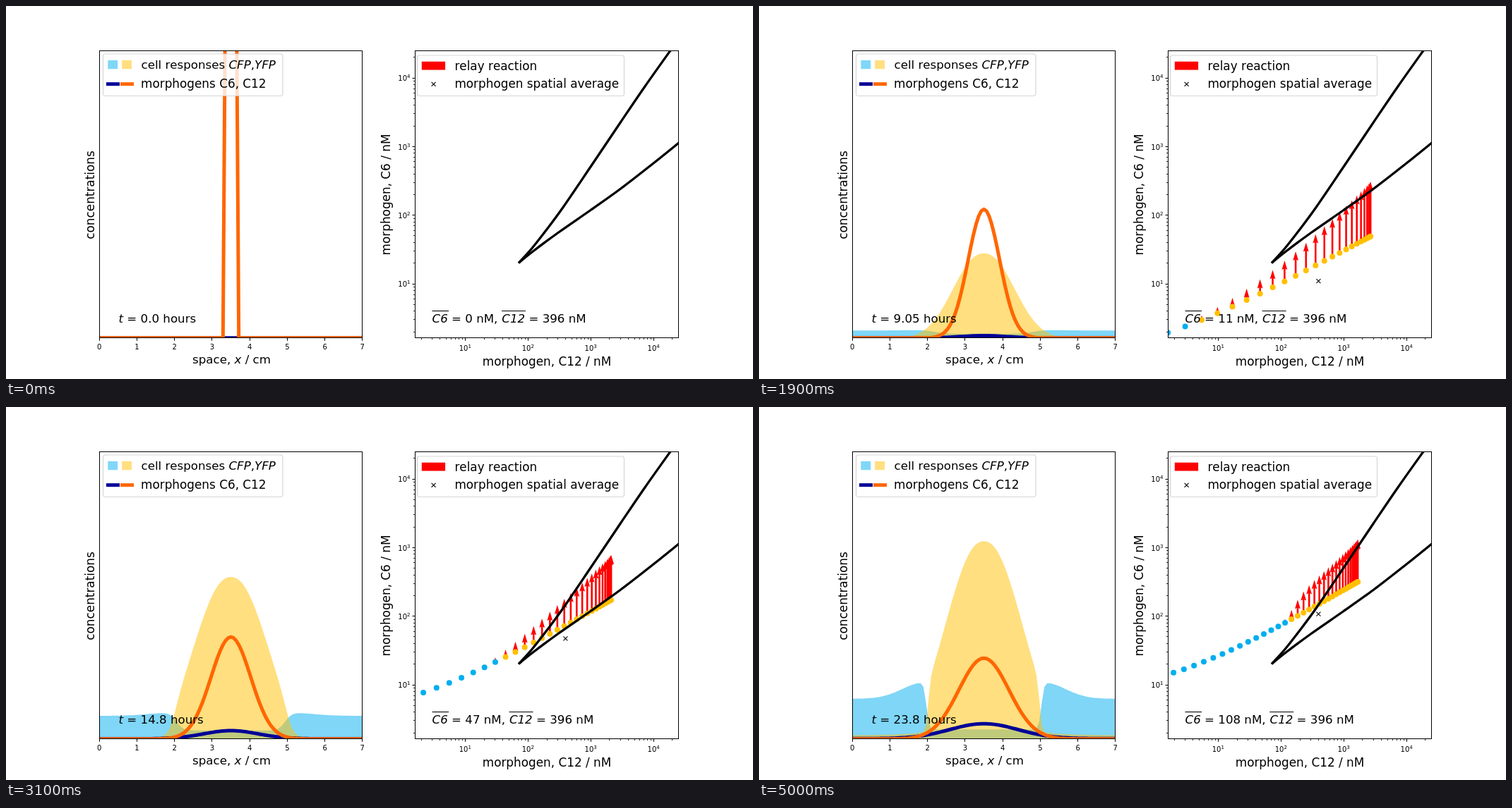
Recreate the animation shown at these times as an HTML page. Size 1058x529 px, loop 5.1 s.

```html
<!DOCTYPE html>
<html lang="en">
<head>
<meta charset="utf-8">
<title>Morphogen relay</title>
<style>
  html, body { margin: 0; width: 100%; height: 100%; overflow: hidden; background: #fff; }
  svg { display: block; width: 1058px; height: 529px; }
  text { font: 16.67px "DejaVu Sans", sans-serif; font-kerning: none; white-space: pre; }
  .plain { font-size: 16.85px; }
  .mid { text-anchor: middle; }
  .tick text { font-size: 10px; text-anchor: middle; }
  .tick .end { text-anchor: end; }
  .tick .exp { font-size: 7px; }
  .i { font-style: italic; }
  .line { fill: none; stroke-width: 5; stroke-linejoin: round; }
  .edge { fill: none; stroke-width: 3.3; stroke: #000; stroke-linejoin: round; }
  .axis { fill: none; stroke: #000; stroke-width: 1; }
  .minor { fill: none; stroke: #000; stroke-width: .8; }
  .box { fill: #fff; fill-opacity: .8; stroke: #ccc; stroke-opacity: .8; stroke-width: 1.2; }
  .thin { fill: none; stroke: #000; stroke-width: 1.1; }
</style>
</head>
<body>
<svg viewBox="0 0 1058 529">
  <clipPath id="clipL"><rect x="132.25" y="63.5" width="372.5" height="407.3"/></clipPath>
  <clipPath id="clipR"><rect x="579.6" y="63.5" width="372.6" height="407.3"/></clipPath>

  <g clip-path="url(#clipL)">
    <path id="cfp" fill="#00aeef" fill-opacity=".5"/>
    <path id="yfp" fill="#ffc000" fill-opacity=".5"/>
    <path id="c6" class="line" stroke="#000096"/>
    <path id="c12" class="line" stroke="#ff6600"/>
  </g>
  <rect class="axis" x="132.5" y="63.5" width="372" height="407"/>
  <g>
    <rect class="box" x="137.5" y="68" width="254.5" height="59.5" rx="3.5"/>
    <rect x="144.3" y="77" width="13.8" height="12.3" fill="#7fd7f7"/>
    <rect x="164.2" y="77" width="13.8" height="12.3" fill="#ffdf80"/>
    <path d="M142 110.7h19" stroke="#000096" stroke-width="5"/>
    <path d="M162 110.7h19" stroke="#ff6600" stroke-width="5"/>
    <text x="191.5" y="89">cell responses <tspan class="i">CFP</tspan>,<tspan class="i">YFP</tspan></text>
    <text class="plain" x="191" y="116.3">morphogens C6, C12</text>
  </g>
  <text x="159.5" y="449"><tspan class="i">t</tspan> = <tspan id="hours">0.0</tspan> hours</text>
  <text class="mid" x="319.5" y="506.5">space, <tspan class="i">x</tspan> / cm</text>
  <text class="plain mid" transform="translate(125.3 268) rotate(-90)">concentrations</text>

  <g clip-path="url(#clipR)">
    <path id="arrows" fill="#f00"/>
    <path id="blue" fill="#00aeef"/>
    <path id="gold" fill="#ffc000"/>
    <path id="upper" class="edge"/>
    <path id="lower" class="edge"/>
    <path id="mean" class="thin" d="M-3-3l6 6m0-6l-6 6"/>
  </g>
  <rect class="axis" x="579.5" y="63.5" width="373" height="407"/>
  <g>
    <rect class="box" x="582.5" y="70" width="293" height="57.5" rx="3.5"/>
    <rect x="588.8" y="78.8" width="33.3" height="11.8" fill="#f00"/>
    <path class="thin" d="M602.6 107.8l6 6m0-6l-6 6"/>
    <text class="plain" x="635.4" y="91">relay reaction</text>
    <text class="plain" x="635.4" y="116.3">morphogen spatial average</text>
  </g>
  <text x="603.5" y="449"><tspan class="i">C6</tspan> = <tspan id="avg">0</tspan> nM, </text>
  <path class="thin" d="M603.5 432.5h23.5"/>
  <g id="second">
    <text x=".3" y="449"><tspan class="i">C12</tspan> = 396 nM</text>
    <path class="thin" d="M0 432.5h34"/>
  </g>
  <text class="plain mid" x="766" y="510">morphogen, C12 / nM</text>
  <text class="plain mid" transform="translate(544 267.5) rotate(-90)">morphogen, C6 / nM</text>
  <g class="tick" id="ticks"></g>
  <path class="axis" id="major"/>
  <path class="minor" id="minor"/>
</svg>
<script>
const $ = id => document.getElementById(id);
const BASE = 470.8, NM_PER_PX = 14.62, STEP = 0.07, N = 101;
const cmX = x => 132.25 + 53.22 * x;
const logX = c => 561.35 + 88.95 * Math.log10(c);
const logY = c => 491.3 - 97.3 * Math.log10(c);
const sigmoid = u => 1 / (1 + Math.exp(-u));
const softplus = (u, s) => s * Math.log1p(Math.exp(u / s));
const gauss = (d, v) => Math.exp(-d * d / (2 * v)) / Math.sqrt(2 * Math.PI * v);
const px = n => n.toFixed(2);
const snap = n => Math.floor(n) + 0.5;

// Cell response shape over time:
// step, yellow [height, width, cutoff, softness, tail], blue [outer, bump, cutoff, softness, inner]
const KEYS = [
  [0,  0,     .35,  2.6,  .2,  0,   0,    0,   1.3,  .15,  0],
  [7,  72.5,  .6,   2.6,  .2,  0,   .6,   0,   1.3,  .15,  .3],
  [19, 120,   1.08, 2.3,  .2,  .2,  10.5, .8,  1.3,  .15,  6],
  [27, 202.5, 1.25, 1.65, .13, 1,   26.5, 1.5, 1.38, .11,  10.5],
  [35, 249.5, 1.3,  1.53, .07, 2.5, 38.5, 8,   1.5,  .07,  13],
  [43, 272,   1.33, 1.5,  .04, 4,   49,   15,  1.53, .05,  13.5],
  [50, 280.5, 1.345, 1.49, .03, 5,  57,   23,  1.53, .035, 13.5]
];

function slope(i, j) {
  const a = KEYS[Math.max(i - 1, 0)], b = KEYS[Math.min(i + 1, KEYS.length - 1)];
  return (b[j] - a[j]) / (b[0] - a[0]);
}

function shapeAt(k) {
  let i = 0;
  while (i < KEYS.length - 2 && k >= KEYS[i + 1][0]) i++;
  const a = KEYS[i], b = KEYS[i + 1], w = b[0] - a[0], u = (k - a[0]) / w;
  return a.slice(1).map((p, n) => {
    const j = n + 1, q = b[j], m = slope(i, j) * w, e = slope(i + 1, j) * w;
    const v = p + u * (m + u * (3 * (q - p) - 2 * m - e + u * (2 * (p - q) + m + e)));
    return Math.max(0, v);
  });
}

// Five loaded grid points spreading by diffusion.
function c12At(d, t) {
  if (t === 0) return Math.abs(d) < 2.5 * STEP ? 8000 : 0;
  let sum = 0;
  for (let j = -2; j <= 2; j++) sum += gauss(d - j * STEP, 0.01825 * t);
  return 8000 * STEP * sum;
}

const meanC6 = t => 6.67 * softplus(t - 7.68, 1.1);
const c6At = (d, t) => meanC6(t) * (0.065 + 0.935 * 7 * gauss(d, 0.065 + 0.0318 * t));
const relayRate = t => 0.0338 * softplus(t - 6.2, 0.8);

function curve(height) {
  const pts = [];
  for (let i = 0; i < N; i++) {
    pts.push(px(cmX(i * STEP)) + ' ' + px(BASE - height((i - 50) * STEP)));
  }
  return 'M' + pts.join('L');
}
const area = height => curve(height) + `L${cmX(7)} ${BASE}L${cmX(0)} ${BASE}Z`;

function arrow(x, y, tip) {
  const len = y - tip;
  if (len < 0.5) return '';
  const s = Math.min(1, len / 13), w = 1.3 * s, h = 3.9 * s;
  const neck = tip + 11.7 * s, wing = tip + 13 * s;
  return `M${px(x - w)} ${px(y)}L${px(x - w)} ${px(neck)}L${px(x - h)} ${px(wing)}L${px(x)} ${px(tip)}` +
    `L${px(x + h)} ${px(wing)}L${px(x + w)} ${px(neck)}L${px(x + w)} ${px(y)}Z`;
}
const dot = (x, y) => `M${px(x - 4)} ${px(y)}a4 4 0 1 0 8 0a4 4 0 1 0-8 0Z`;

function hoursText(t) {
  const v = +t.toPrecision(3);
  return Number.isInteger(v) ? v.toFixed(1) : String(v);
}

function draw(k) {
  const t = k * 10 / 21;
  const [peak, wide, yCut, ySoft, tail, outer, bump, bCut, bSoft, inner] = shapeAt(k);

  $('yfp').setAttribute('d', area(x => {
    const d = Math.abs(x), on = sigmoid((yCut - d) / ySoft);
    const low = tail * (1 + Math.exp(-(d - 1.5) / 0.7));
    return on * peak * Math.exp(-Math.pow(d / wide, 2.22)) + (1 - on) * low;
  }));
  $('cfp').setAttribute('d', area(x => {
    const d = Math.abs(x), hill = bump * Math.exp(-Math.pow((d - 1.6) / 0.8, 2));
    return inner + sigmoid((d - bCut) / bSoft) * (outer - inner + hill);
  }));
  $('c6').setAttribute('d', curve(d => c6At(d, t) / NM_PER_PX));
  $('c12').setAttribute('d', curve(d => c12At(d, t) / NM_PER_PX));

  let arrows = '', blue = '', gold = '';
  for (let i = 50; i >= 0; i--) {
    const d = i * STEP, a = c12At(d, t), b = c6At(d, t);
    if (a < 1) continue;
    const x = logX(a), y = logY(b);
    const rate = relayRate(t) * a * sigmoid((yCut - 0.05 - d) / (ySoft + 0.03));
    arrows += arrow(x, y, logY(b + rate));
    if (d < 1.5) gold += dot(x, y); else blue += dot(x, y);
  }
  $('arrows').setAttribute('d', arrows);
  $('blue').setAttribute('d', blue);
  $('gold').setAttribute('d', gold);

  const mean = meanC6(t), label = String(Math.round(mean));
  $('mean').setAttribute('transform', `translate(${px(logX(396))} ${px(logY(mean))})`);
  $('hours').textContent = hoursText(t);
  $('avg').textContent = label;
  $('second').setAttribute('transform', `translate(${702 + 10.6 * (label.length - 1)} 0)`);
}

// Smooth path through a few points.
function spline(p) {
  let d = `M${p[0]}`;
  for (let i = 0; i < p.length - 1; i++) {
    const a = p[Math.max(i - 1, 0)], b = p[i], c = p[i + 1], e = p[Math.min(i + 2, p.length - 1)];
    const mix = (q, r, s, n) => q[n] + (r[n] - s[n]) / 6;
    d += `C${mix(b, c, a, 0)} ${mix(b, c, a, 1)} ${mix(c, b, e, 0)} ${mix(c, b, e, 1)} ${c}`;
  }
  return d;
}

function drawAxes() {
  let text = '', major = '', minor = '';
  for (let i = 0; i <= 7; i++) {
    major += `M${snap(cmX(i))} ${BASE}v4`;
    text += `<text x="${cmX(i)}" y="486.8">${i}</text>`;
  }
  for (let p = 0; p <= 4; p++) {
    const c = 10 ** p, power = `10<tspan class="exp" dy="-4">${p}</tspan>`;
    if (p) {
      major += `M${snap(logX(c))} ${BASE}v4M579.5 ${snap(logY(c))}h-4`;
      text += `<text x="${logX(c)}" y="489">${power}</text>`;
      text += `<text class="end" x="572.5" y="${logY(c) + 4.3}">${power}</text>`;
    }
    for (let m = 2; m < 10; m++) {
      if (m * c > 25000) break;
      minor += `M${snap(logX(m * c))} ${BASE}v2.4`;
      if (logY(m * c) > 64) minor += `M579.5 ${snap(logY(m * c))}h-2.5`;
    }
  }
  $('ticks').innerHTML = text;
  $('major').setAttribute('d', major);
  $('minor').setAttribute('d', minor);
  $('upper').setAttribute('d', spline([[726, 364.5], [745, 343.5], [765, 318], [789, 285.5],
    [828, 228], [870, 165.5], [905, 114], [944, 59]]));
  $('lower').setAttribute('d', spline([[726, 364.5], [745, 349], [782, 321.5], [828, 289.5],
    [870, 259.5], [917, 223], [956, 191.5]]));
}

drawAxes();
let shown = -1;
const start = performance.now();
function tick() {
  const k = Math.floor((performance.now() - start) % 5100 / 100);
  if (k !== shown) draw(shown = k);
  requestAnimationFrame(tick);
}
tick();
</script>
</body>
</html>
```
